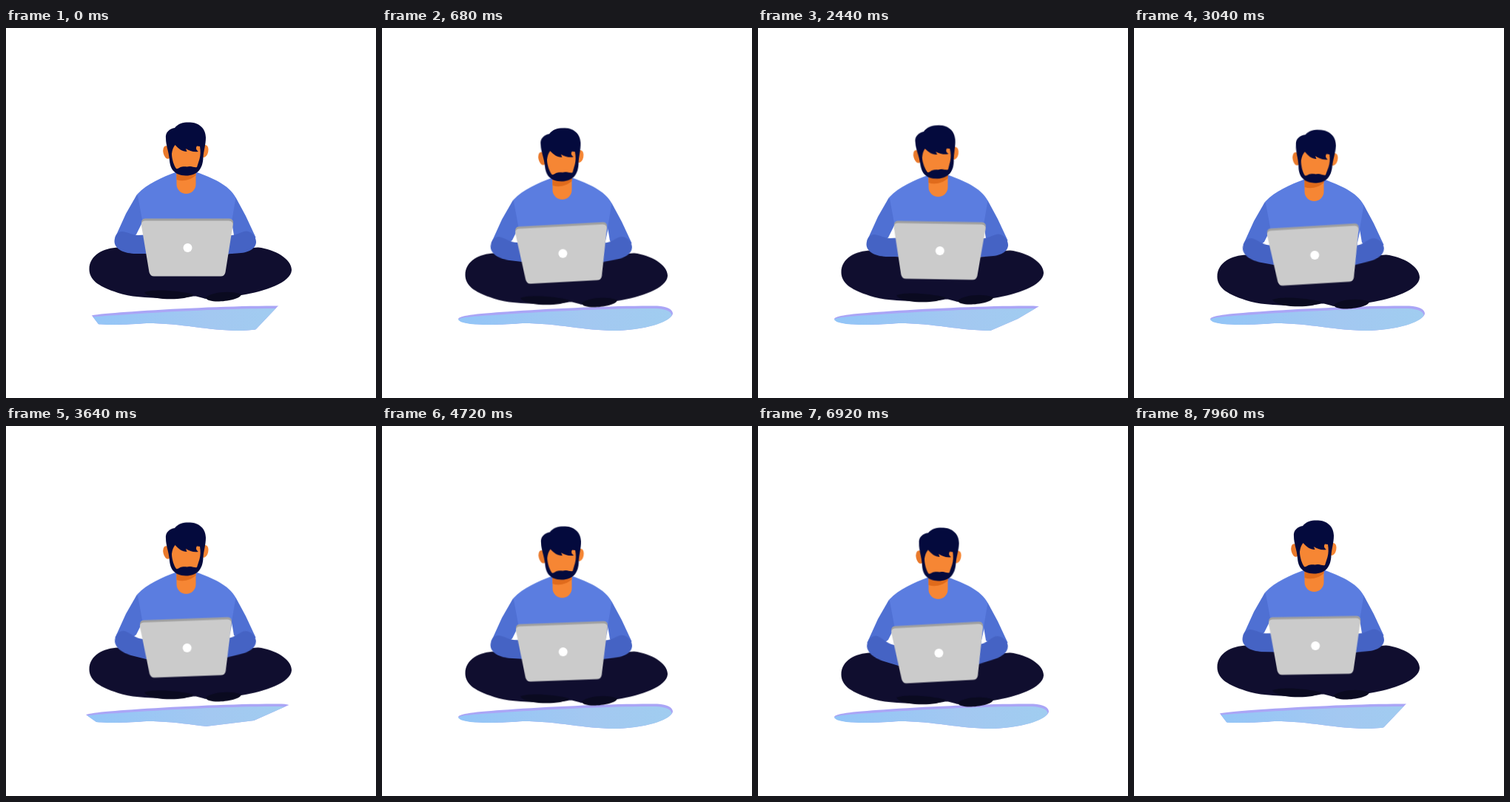
An HTML page for the animation above (8 s loop, 500x500 px).

```html
<!DOCTYPE html>
<html lang="en">
<head>
<meta charset="utf-8">
<title>Working on a laptop</title>
<style>
  html, body { margin: 0; width: 100%; height: 100%; overflow: hidden; background: #fff; }
  svg { position: absolute; left: 0; top: 0; width: 500px; height: 500px; }

  :root { --sine: cubic-bezier(.37, 0, .63, 1); }

  #body { animation: bob 2s var(--sine) infinite; }
  #head { transform-origin: 244px 207px; animation: nod 2s var(--sine) infinite; }
  #laptop { transform-origin: 245px 318px; animation: tilt .8s infinite; }
  #armL { transform-origin: 162px 290px; animation: typeL .8s var(--sine) infinite; }
  #armR { transform-origin: 322px 290px; animation: typeR .8s var(--sine) infinite; }
  #puddle { animation: cut 8s linear infinite; }

  @keyframes bob {
    0%, 100% { transform: translateY(0); }
    50% { transform: translateY(10px); }
  }
  @keyframes nod {
    0%, 80%, 100% { transform: rotate(0deg); }
    20% { transform: rotate(-3.4deg); }
    60% { transform: rotate(3.4deg); }
  }
  @keyframes tilt {
    0% { transform: rotate(0deg); animation-timing-function: cubic-bezier(.3, .5, .65, 1); }
    30% { transform: rotate(3.3deg); animation-timing-function: var(--sine); }
    80% { transform: rotate(-3.4deg); animation-timing-function: cubic-bezier(.4, 0, .7, .8); }
    100% { transform: rotate(0deg); }
  }
  @keyframes typeL {
    0%, 30%, 100% { transform: rotate(0deg); }
    65% { transform: rotate(17deg); }
  }
  @keyframes typeR {
    0%, 30%, 100% { transform: rotate(0deg); }
    70% { transform: rotate(-14deg); }
  }
  /* slanted cuts at both ends of the puddle open and close */
  @keyframes cut {
    0%, 95%, 100% { clip-path: polygon(102px 370px, 373px 370px, 352px 392px, 333px 412px, 134px 412px); }
    7%, 24%, 38%, 52%, 62%, 80%, 91% { clip-path: polygon(80px 370px, 420px 370px, 420px 390px, 420px 412px, 80px 412px); }
    30.5% { clip-path: polygon(80px 370px, 390px 370px, 351px 393px, 307px 412px, 80px 412px); }
    45.5% { clip-path: polygon(80px 370px, 398px 370px, 335px 398px, 245px 409px, 139px 412px); }
    73.5% { clip-path: polygon(100px 370px, 400px 370px, 386px 390px, 369px 412px, 142px 412px); }
  }
</style>
</head>
<body>
<svg id="puddle" viewBox="0 0 500 500">
  <defs>
    <linearGradient id="water" gradientUnits="userSpaceOnUse" x1="103" y1="0" x2="393" y2="0">
      <stop offset="0" stop-color="#92c5f7"/>
      <stop offset=".6" stop-color="#a3c8f1"/>
      <stop offset="1" stop-color="#a0cdf0"/>
    </linearGradient>
  </defs>
  <path fill="#aaa5f6" d="M103 393C106 388 130 386 180 382.5C240 378.5 320 375 372 375.5C386 376 393 381 393 386C392 394 365 407 318 409C270 409 240 399 190 399C165 401 108 404 103 393Z"/>
  <path fill="url(#water)" d="M103 394C108 390 130 389.5 180 386C240 382 320 378.5 370 379C383 379.5 391 383 391.500 388C390 395 365 407 318 409C270 409 240 399 190 399C165 401 108 404 103 394Z"/>
</svg>

<svg viewBox="0 0 500 500">
  <g id="body">
    <!-- torso -->
    <path fill="#5b7de0" d="M229 195C212 201 190 211 178 224L177 230L184 264L192 282L192 315H298L302 280L306 262L311 230C301 211 277 202 258 195Z"/>

    <!-- legs and shoes -->
    <path fill="#100e2f" d="M112.500 326C112.500 307 132 297 152 296.500C172 297 182 306 200 306H292C312 306 324 296 341 296.500C363 299 386 312 386 327C385 344 350 356 318 361C300 364 284 365 271 366C264 365 260 362 253 362.500C240 365 222 366 206 365C180 364 160 362 146 356C125 349 112.500 340 112.500 326Z"/>
    <path fill="#0a0a20" d="M187 357C200 352 235 355 254 360C246 366 228 367 212 366C202 365 190 363 187 357Z"/>
    <path fill="#0a0a20" d="M270 364C278 357 304 354 318 360C317 366 297 370 283 369.500C275 369 270 367 270 364Z"/>

    <!-- upper arms -->
    <path fill="#4f70d3" d="M177.500 224L162 251L147.500 283L160 292L176 279L184.500 262Z"/>
    <path fill="#4f70d3" d="M310.500 229L324 254L337.500 283L325 292L308 280L305 262Z"/>

    <!-- forearms -->
    <path id="armL" fill="#4563c4" d="M157 275C166 276 171 280 178 280L200 279V305H176C160 305 146.500 299 146.500 288C147 280 151 275 157 275Z"/>
    <path id="armR" fill="#4563c4" d="M325 274.500C332 275 338 282 338 289C338 298 328 304 312 304.500L290 306V281L306 280C314 279 318 275 325 274.500Z"/>

    <!-- neck -->
    <path fill="#f68634" d="M230.500 190H256.500V211A13 13 0 0 1 230.500 211Z"/>
    <path fill="#e06b1c" d="M230.500 190H256.500V199C250 205 240 208 230.500 205Z"/>

    <g id="head">
      <ellipse cx="217.500" cy="168" rx="5" ry="9" fill="#e9792b" transform="rotate(-12 217.500 168)"/>
      <ellipse cx="268.500" cy="166.500" rx="4.800" ry="8.500" fill="#f68634" transform="rotate(12 268.500 166.500)"/>
      <path fill="#040a3d" d="M216 149C215 141 221 136 228 135C233 128 242 127 249 127.500C261 128 270 136 270 148C270 158 267 166 266.500 175C266 190 259 199.500 243 199.500C228 199 222 191 221 179C220 166 216 159 216 149Z"/>
      <path fill="#f68634" d="M228.500 158C233 163 238 167 244.500 167L243 163C248 166 253 168 260 167C257 165 256 162 258 159.500L262 160C263 166 263 172 261.500 177L258 188C254 189 252 186.500 248 187C244 188 243 187 238 187.500C234 188 233 191 230 190C227 186 224 177 224 170C224.500 165 226 161 228.500 158Z"/>
    </g>

    <g id="laptop">
      <path fill="#a0a0a0" d="M188 257.500H302Q307.500 258 307 264L306 270H184L183 264Q182.500 258 188 257.500Z"/>
      <path fill="#cbcbcb" d="M188 260.500H301Q307.500 261 306.500 267L296.500 330Q295.500 335.500 290 335.500H200Q195 335.500 193.500 330L183 267Q182 261 188 260.500Z"/>
      <circle cx="245.500" cy="297" r="6" fill="#fff"/>
    </g>
  </g>
</svg>
</body>
</html>
```
